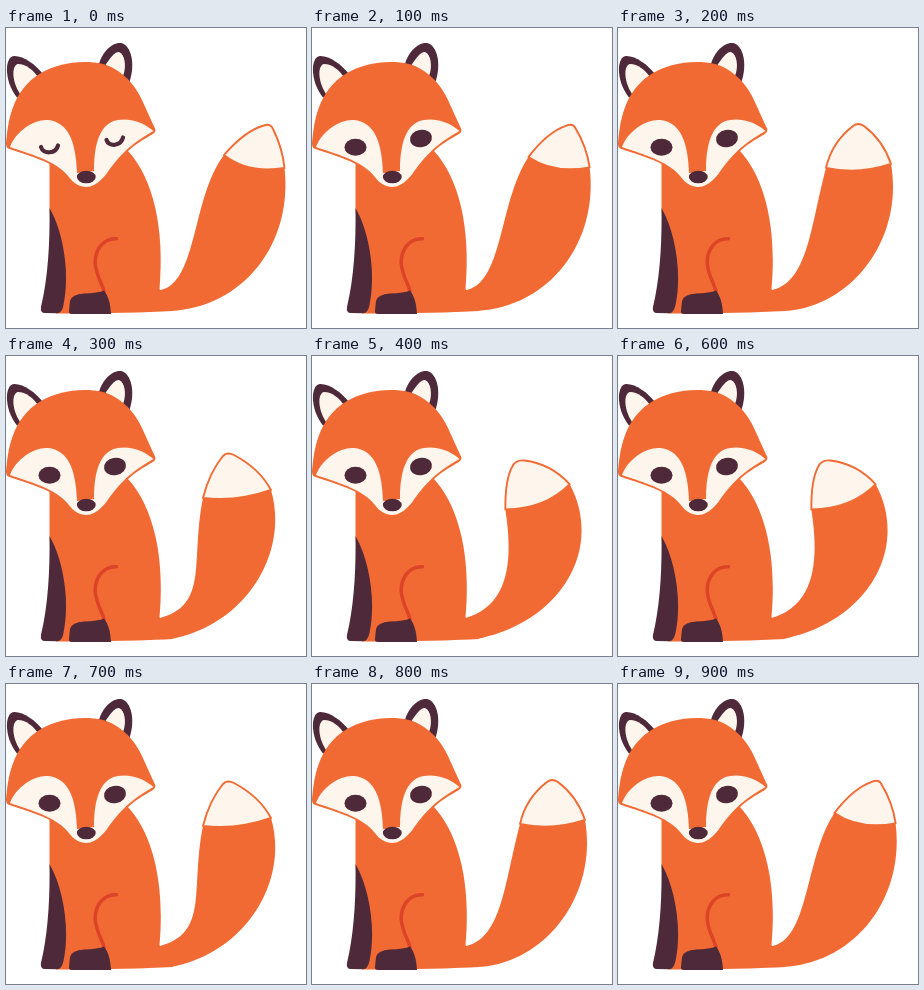
These frames come from a looping animation (300x300 px, 1 s). An HTML page:

```html
<!DOCTYPE html>
<html lang="en">
<head>
<meta charset="utf-8">
<title>Blinking fox</title>
<style>
html, body { margin: 0; width: 100%; height: 100%; overflow: hidden; background: #fff; }
svg { display: block; width: 100vw; height: 100vh; }
.orange { fill: #f26a33; }
.cream { fill: #fef5ec; }
.dark { fill: #4e293a; }
.rim { stroke: #f26a33; stroke-width: 1.9; stroke-linejoin: round; }
.line { fill: none; stroke-linecap: round; }
</style>
</head>
<body>
<svg viewBox="0 0 300 300">
  <path id="tail" class="orange"/>
  <path id="tip" class="cream rim"/>

  <path class="orange" d="M43.5 130L122 123C147 150 159 200 153.500 261L167 283C135 284.500 85 286 50 285.500L43.500 180Z"/>
  <path class="dark" d="M43.500 180C58 205 64 247 57.500 277Q56 285 51 285.300L39 285Q34 285 35 279C42 250 44 215 43.500 180Z"/>
  <path class="line" stroke="#dc4327" stroke-width="3.500" d="M110.500 210.700C97 210 89 222 89.200 235C90 247 95 253 98 263"/>
  <path class="dark" d="M63 283L64 273Q66 266 78 265.500Q92 265 98 262.500C103 269 104.500 277 105 286L66 286Q62.500 286 63 283Z"/>

  <path class="dark" d="M11 69.500C-2 54 -2 28 8.500 28C18 28 30 37 37 46L30 60Z"/>
  <path class="cream" d="M14 66C5 52 6 37 12 36C20 36 27 42 32 49L28 62Z"/>
  <path class="dark" d="M92.500 38C95 25 106 14 115 15C125 17 130 36 123 55L108 52Z"/>
  <path class="cream" d="M99 38C104 29 110 23 113 24C118.500 26 121 38 117 48L108 50Z"/>

  <path class="orange" d="M35 45C50 36 75 31 97 36C115 41 128 56 134 68C140 80 143 88 149.300 101Q150 104 147 106C125 118 116 127 101.500 148C94 157 86 161 80 161C74 161 66 157 61 149.500C50 134 20 127 2 120.500Q0 119 0 116C2 95 5 63 35 45Z"/>
  <path class="cream" d="M4 119C10 103 28 91 42 92C62 94 70 113 71 145L88 143C88 108 98 94 112 92C122 90 136 93 147.500 103C126 115 114 126 100 146.500C92 156 86 159 80 159C74 159 67 155 62.500 148.500C50 132 20 125 4 119Z"/>
  <ellipse class="dark" cx="80.300" cy="149" rx="9.400" ry="6.300"/>

  <g id="open" class="dark">
    <ellipse cx="43.500" cy="119.300" rx="11" ry="8.500"/>
    <ellipse cx="109" cy="110.500" rx="11" ry="8.700" transform="rotate(-10 109 110.500)"/>
  </g>
  <g id="shut" class="line" stroke="#4e293a" stroke-width="4.200">
    <path d="M35 119C37 126.500 50 126 52 117.500"/>
    <path d="M100.500 112C103 119.500 115 118 117 109.500"/>
  </g>
</svg>
<script>
const $ = id => document.getElementById(id);

// inner: base to left end of the band; crown: around the tip to its right end;
// band: control point of the tip's lower edge; outer: handles back to the base
const right = {
  inner: [192,258, 185,170, 218,127],
  crown: [231,112, 245,101, 258,97.5, 265,95, 267,101, 273,113, 277,125, 278.5,140],
  band: [242,146],
  outer: [287,215, 238,279]
};
const upright = {
  inner: [190,256, 192,200, 208,140],
  crown: [212,122, 222,108, 235,98, 240,94, 246,98, 258,107, 267,118, 273,136],
  band: [240,147],
  outer: [286,210, 234,280]
};
const leaning = {
  inner: [204,250, 184,205, 197,142],
  crown: [201,126, 207,112, 217,100, 221,95.5, 228,99, 243,107, 257,119, 265,134],
  band: [231,146],
  outer: [283,195, 242,268]
};
const curled = {
  inner: [192,250, 217,203, 190,164],
  crown: [186,150, 182,132, 184.5,121, 187,111, 198,109.5, 217,106, 235,111, 251,123],
  band: [235,160],
  outer: [299,187, 260,263]
};

function mix(a, b, k) {
  const pose = {};
  for (const part in a) pose[part] = a[part].map((v, i) => v + (b[part][i] - v) * k);
  return pose;
}

const swing = [right, mix(right, upright, 0.16), upright, leaning, mix(leaning, curled, 0.52), curled];

function drawTail({ inner, crown, band, outer }) {
  const left = inner.slice(4);
  const top = `C${crown.slice(0, 6)}Q${crown.slice(6, 10)}C${crown.slice(10)}`;
  $("tail").setAttribute("d", `M152 262.500C${inner}${top}C${outer} 165,283L150 280Z`);
  $("tip").setAttribute("d", `M${left}${top}Q${band} ${left}Z`);
}

let shown = -1;
function tick() {
  const step = Math.floor(performance.now() % 1000 / 100);
  if (step !== shown) {
    shown = step;
    drawTail(swing[Math.min(step, 10 - step)]);
    const blink = step % 5 === 0;
    $("open").style.display = blink ? "none" : "";
    $("shut").style.display = blink ? "" : "none";
  }
  requestAnimationFrame(tick);
}
tick();
</script>
</body>
</html>
```
